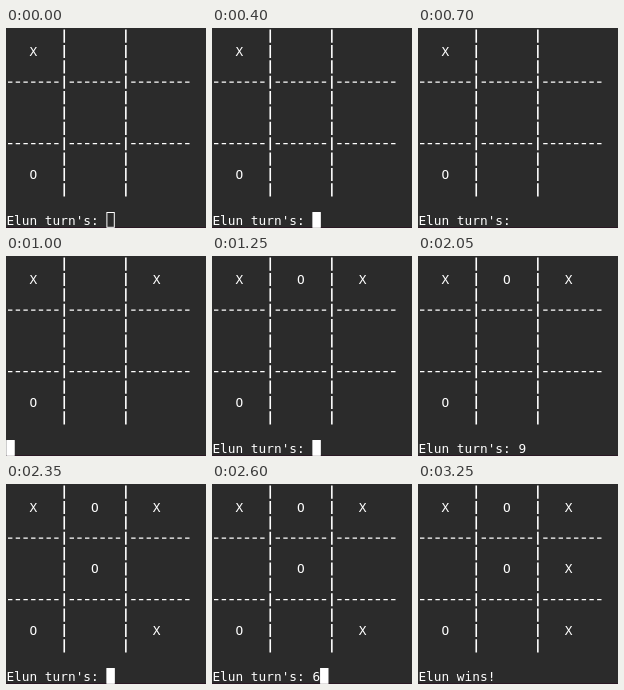
An HTML page for the animation above (3900 ms loop, 200 by 200 pixels).

```html
<!DOCTYPE html>
<html lang="en">
<head>
<meta charset="utf-8">
<title>Tic-tac-toe in a terminal</title>
<style>
  html, body { margin: 0; width: 100%; height: 100%; overflow: hidden; background: #2b2b2b; }
  svg { display: block; width: 100vw; height: 100vh; }
  text { font: 12.79px "DejaVu Sans Mono", "Noto Sans Mono", monospace; fill: #fff; white-space: pre; }
  .grid { stroke: #fff; fill: none; }
</style>
</head>
<body>
<svg id="stage" viewBox="0 0 200 200">
  <rect width="200" height="200" fill="#2b2b2b"/>
  <rect y="199" width="200" height="1" fill="#2a1824"/>
</svg>
<script>
const LOOP = 3900, LEFT = 0.4, COL = 7.7, ROW = 15.38, PROMPT_ROW = 12;
const PLAYER = "Elun";
const ASK = `${PLAYER} turn's: `;
const stage = document.getElementById("stage");
const colX = col => LEFT + col * COL;

function add(tag, attrs) {
  const el = document.createElementNS("http://www.w3.org/2000/svg", tag);
  for (const key in attrs) el.setAttribute(key, attrs[key]);
  return stage.appendChild(el);
}

function addText(col, row, value = "") {
  const el = add("text", { x: colX(col), y: row * ROW + 12.2 });
  el.textContent = value;
  return el;
}

// Grid strokes, one dash per character cell
function addRule(d, width, dash, cell) {
  add("path", { d, class: "grid", "stroke-width": width, "stroke-dasharray": `${dash} ${cell - dash}` });
}
for (const col of [7, 15]) addRule(`M${colX(col + 0.5) + 0.1} 1.5V${11 * ROW}`, 1.6, 13.2, ROW);
for (const row of [3, 7]) {
  const y = (row + 0.5) * ROW + 0.3;
  for (const [from, to] of [[0, 7], [8, 15], [16, 24]])
    addRule(`M${colX(from) + 1.6} ${y}H${colX(to)}`, 1.3, 4.4, COL);
}

// Moves: square 1-9, mark, time it appears
const marks = [
  [1, "X", 0], [7, "O", 0], [3, "X", 1000], [2, "O", 1100],
  [9, "X", 2200], [5, "O", 2300], [6, "X", 2700]
].map(([square, mark, at]) => {
  const n = square - 1;
  return { at, el: addText(3 + 8 * (n % 3), 1 + 4 * Math.floor(n / 3), mark) };
});

// Bottom line: start time, text, cursor style
const states = [
  [0, ASK, "hollow"], [400, ASK, "solid"], [700, ASK, "off"],
  [900, ASK + "3", "solid"], [1000, "", "solid"],
  [1100, ASK, "solid"], [1300, ASK, "off"], [1600, ASK, "solid"],
  [1750, ASK + "9", "solid"], [2050, ASK + "9", "off"], [2200, "", "solid"],
  [2300, ASK, "solid"], [2500, ASK, "off"], [2600, ASK + "6", "solid"],
  [2700, `${PLAYER} wins!`, "off"]
];
const line = addText(0, PROMPT_ROW);
const cursor = add("rect", { y: 184.5, width: 7.4, height: 14.8, stroke: "#fff" });

function render(t) {
  for (const { at, el } of marks) el.setAttribute("visibility", t >= at ? "visible" : "hidden");
  const [, value, style] = states.findLast(([at]) => t >= at);
  if (line.textContent !== value) line.textContent = value;
  cursor.setAttribute("x", colX(value.length) + 0.4);
  cursor.setAttribute("fill", style === "solid" ? "#fff" : "none");
  cursor.setAttribute("visibility", style === "off" ? "hidden" : "visible");
}

const start = performance.now();
function tick() {
  render((performance.now() - start) % LOOP);
  requestAnimationFrame(tick);
}
tick();
</script>
</body>
</html>
```
